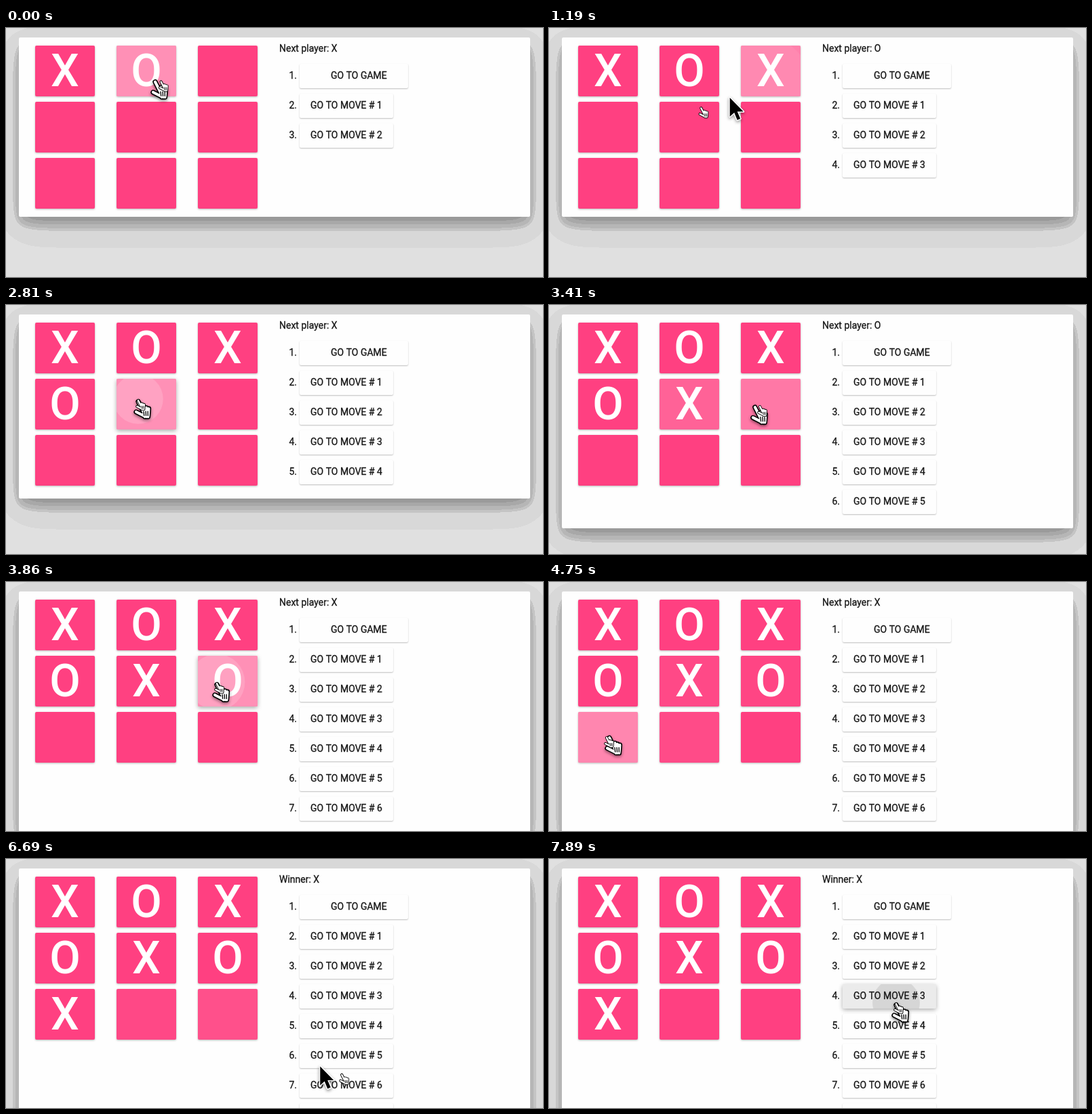
An HTML page with a canvas for the animation above (8000 ms loop, 792x368 px).

```html
<!DOCTYPE html>
<html lang="en">
<head>
<meta charset="utf-8">
<title>Tic-tac-toe</title>
<style>
  html, body { margin: 0; width: 100%; height: 100%; overflow: hidden; background: #e0e0e0; }
  canvas { display: block; }
</style>
</head>
<body>
<canvas id="stage" width="792" height="368"></canvas>
<script>
const W = 792, H = 368, LOOP = 8000, STEP = 148.6, LEAD = 80, MARK_DELAY = 130;
const ctx = document.getElementById('stage').getContext('2d');
const FONT = 'Roboto, Arial, sans-serif';
const CARD = { x: 19, y: 14, w: 754 };

const cellBox = i => ({ x: 43 + i % 3 * 120, y: 26 + Math.floor(i / 3) * 83, w: 88, h: 75 });
const rowBox = i => ({ x: 433, y: 53 + i * 44, w: i ? 138 : 160, h: 36 });
const inside = (p, b, h = b.h) => p.x >= b.x && p.x <= b.x + b.w && p.y >= b.y && p.y <= b.y + h;
const cells = Array.from({ length: 9 }, (_, i) => cellBox(i));
const cellAt = p => cells.findIndex(b => inside(p, b));

// Where the pointer rests, when it gets there and when it clicks.
const stops = [
  { x: 220, y: 76, at: 0 },
  { x: 308, y: 90, at: 383, press: 610 },
  { x: 92, y: 158, at: 1588, press: 1800 },
  { x: 195, y: 139, at: 2425, press: 2710 },
  { x: 311, y: 148, at: 3480, press: 3730 },
  { x: 85, y: 228, at: 4800, press: 5060 },
  { x: 184, y: 216, at: 5570 },
  { x: 508, y: 321, at: 6851 },
  { x: 512, y: 212, at: 7400, press: 7770 }
];
const clicks = stops.filter(s => s.press);

// Longer trips take longer.
const travel = (a, b) => 260 + 1.3 * Math.hypot(b.x - a.x, b.y - a.y);

function pointer(t) {
  let p = stops[0];
  for (let i = 1; i < stops.length; i++) {
    const a = stops[i - 1], b = stops[i], time = travel(a, b);
    const u = Math.min(1, (t - b.at + time) / time);
    if (u <= 0) break;
    const e = u * u * (3 - 2 * u);
    p = { x: a.x + (b.x - a.x) * e, y: a.y + (b.y - a.y) * e };
  }
  return p;
}

// Hover light: each cell brightens quickly under the pointer and fades slowly.
function hoverLevels(t) {
  const glow = cells.map((_, i) => i === cellAt(stops[0]) ? 1 : 0);
  const dt = 10;
  for (let s = 0; s < t; s += dt) {
    const over = cellAt(pointer(s));
    glow.forEach((g, i) => {
      glow[i] = i === over ? 1 - (1 - g) * Math.exp(-dt / 60) : g * Math.exp(-dt / 140);
    });
  }
  return glow;
}

// Two marks are on the board at the start; each later click adds one.
function boardAt(t) {
  const clicked = clicks.filter(s => t >= s.press + MARK_DELAY).map(cellAt);
  return [0, 1, ...clicked.filter(i => i >= 0)];
}

function outline(b) {
  ctx.beginPath();
  ctx.roundRect(b.x, b.y, b.w, b.h, 2);
}

function box(b, fill, shade = 0, blur = 0, dy = 0) {
  ctx.save();
  ctx.shadowColor = `rgba(0,0,0,${shade})`;
  ctx.shadowBlur = blur;
  ctx.shadowOffsetY = dy;
  ctx.fillStyle = fill;
  outline(b);
  ctx.fill();
  ctx.restore();
}

function ripple(b, click, t, color, strength) {
  const age = t - click.press;
  if (age < 0 || age > 900) return;
  ctx.save();
  outline(b);
  ctx.clip();
  ctx.fillStyle = `rgba(${color},${strength * (1 - age / 900)})`;
  ctx.beginPath();
  ctx.arc(click.x, click.y, 85 * (1 - Math.exp(-age / 200)), 0, 7);
  ctx.fill();
  ctx.restore();
}

function label(text, x, y, align = 'left') {
  ctx.font = '14px ' + FONT;
  ctx.textAlign = align;
  ctx.fillStyle = ctx.strokeStyle = '#161616';
  ctx.lineWidth = 0.3;
  ctx.fillText(text, x, y);
  ctx.strokeText(text, x, y);
}

// Two soft card shadows, reduced to flat grey bands.
const normal = z => 1 / (1 + Math.exp(-1.5976 * z - 0.07057 * z * z * z));
const spread = (n, a, b, sigma) => Array.from({ length: n }, (_, i) =>
  normal((i + 0.5 - a) / sigma) - normal((i + 0.5 - b) / sigma));
const band = v => v > 219.5 ? 224 : v > 197.5 ? 216 : Math.round(v / 14) * 14;
const backdrops = {};

function backdrop(bottom) {
  if (backdrops[bottom]) return backdrops[bottom];
  const img = ctx.createImageData(W, H);
  const layer = (alpha, dy, sigma) => {
    const xs = spread(W, CARD.x, CARD.x + CARD.w, sigma);
    const ys = spread(H, CARD.y + dy, bottom + dy, sigma);
    return (x, y) => 1 - alpha * xs[x] * ys[y];
  };
  const far = layer(0.25, 14, 22.5), near = layer(0.22, 10, 9);
  for (let y = 0, k = 0; y < H; y++) {
    for (let x = 0; x < W; x++, k += 4) {
      const grey = band(224 * far(x, y) * near(x, y));
      img.data.set([grey, grey, grey, 255], k);
    }
  }
  return backdrops[bottom] = img;
}

function drawCell(b, i, t, glow, board) {
  const click = clicks.find(s => cellAt(s) === i);
  const raised = click && t >= click.press && t < click.press + 300;
  if (raised) box(b, '#ff4081', 0.34, 6, 2);
  else box(b, '#ff4081', 0.28, 3, 1);
  box(b, `rgba(255,255,255,${0.42 * glow})`);
  if (click) ripple(b, click, t, '255,255,255', 0.18);

  const turn = board.indexOf(i);
  if (turn < 0) return;
  ctx.font = '500 66px ' + FONT;
  ctx.textAlign = 'center';
  ctx.fillStyle = '#fff';
  ctx.fillText(turn % 2 ? 'O' : 'X', b.x + 44, b.y + 60);
}

function drawRow(i, t) {
  const b = rowBox(i);
  const click = clicks.find(s => inside(s, b));
  if (click && t >= click.press) {
    box(b, '#ebebeb', 0.32, 6, 2);
    ripple(b, click, t, '0,0,0', 0.1);
  } else {
    box(b, '#fefefe', 0.25, 2, 1);
  }
  label(`${i + 1}.`, 429, b.y + 22, 'right');
  if (i) label(`GO TO MOVE # ${i}`, b.x + b.w / 2, b.y + 22, 'center');
  else label('GO TO GAME', 479, b.y + 22);
}

// A hand of round-ended strokes: index finger, thumb, then three fingers.
const hand = new Path2D('M4 2.2L9 12M2.2 11.5L9 15M9 13H13');
const creases = new Path2D();
for (let i = 0; i < 3; i++) {
  hand.moveTo(9 + 2.2 * i, 7 + 0.8 * i);
  hand.lineTo(10 + 1.4 * i, 15.8);
  creases.moveTo(8.8 + 1.9 * i, 11);
  creases.lineTo(9.3 + 1.7 * i, 14.8);
}
const arrow = new Path2D('M0 0V28L6.5 22L11 33L15.5 31L11 20.5H20Z');

function stroke(path, color, width, shadow) {
  ctx.save();
  if (shadow) {
    ctx.shadowColor = 'rgba(0,0,0,.45)';
    ctx.shadowBlur = 4;
    ctx.shadowOffsetY = 2;
  }
  ctx.lineCap = ctx.lineJoin = 'round';
  ctx.strokeStyle = color;
  ctx.lineWidth = width;
  ctx.stroke(path);
  ctx.restore();
}

function drawHand(p, scale, shadow) {
  ctx.save();
  ctx.translate(p.x, p.y);
  ctx.scale(scale, scale);
  ctx.translate(-4, 0);
  stroke(hand, '#000', 4.4, shadow);
  stroke(hand, '#fff', 2.5);
  stroke(creases, '#000', 0.8);
  ctx.restore();
}

function drawArrow(p) {
  ctx.save();
  ctx.translate(p.x, p.y);
  stroke(arrow, '#fff', 3, true);
  ctx.fillStyle = '#000';
  ctx.fill(arrow);
  ctx.restore();
}

function draw(t) {
  const board = boardAt(t), n = board.length, rows = n + 1;
  const bottom = Math.max(279, 66 + 44 * rows);
  ctx.putImageData(backdrop(bottom), 0, 0);
  box({ ...CARD, h: bottom - CARD.y }, '#fefefe');

  const glow = hoverLevels(t);
  cells.forEach((b, i) => drawCell(b, i, t, glow[i], board));
  label(n === 7 ? 'Winner: X' : `Next player: ${n % 2 ? 'O' : 'X'}`, 403, 35);
  for (let i = 0; i < rows; i++) drawRow(i, t);

  const p = pointer(t);
  let over = cellAt(p) >= 0;
  for (let i = 0; i < rows; i++) over = over || inside(p, rowBox(i), 33);
  if (over) drawHand(p, 1.65, true);
  else drawArrow(p);
  drawHand(pointer(t + LEAD), 0.95);
}

// The picture advances in even steps, like a screen capture.
const start = performance.now();
let shown = -1;
function tick() {
  const t = (performance.now() - start) % LOOP;
  const step = Math.floor((t + 16) / STEP);
  if (step !== shown) draw(step * STEP);
  shown = step;
  requestAnimationFrame(tick);
}
tick();
</script>
</body>
</html>
```
